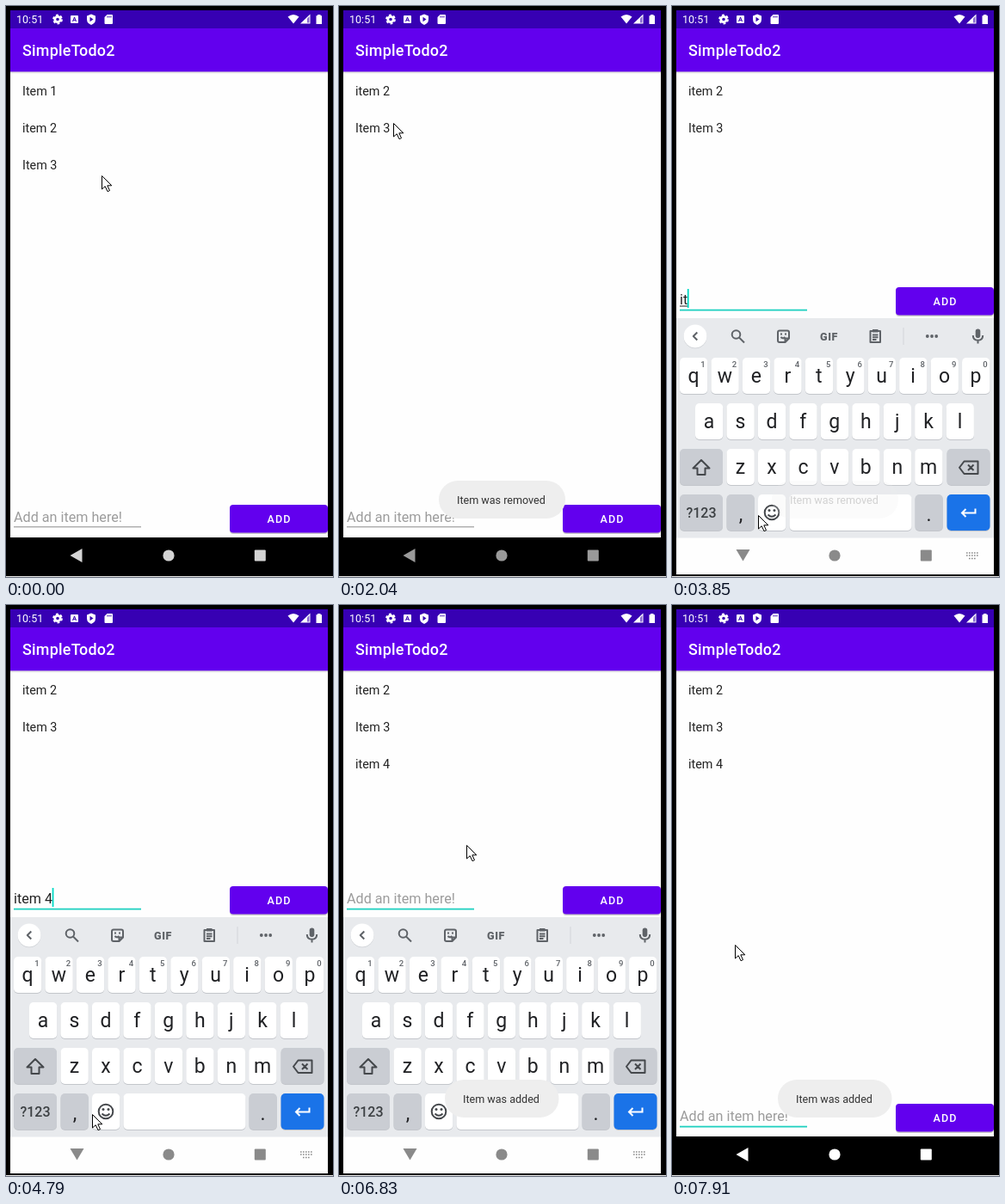
Recreate the animation shown at these times as an HTML page. Size 380x664 px, loop 8000 ms.

```html
<!DOCTYPE html>
<html lang="en">
<head>
<meta charset="utf-8">
<title>Todo list</title>
<style>
html, body { margin: 0; width: 100%; height: 100%; overflow: hidden; background: #000; }
svg { display: block; width: 100%; height: 100%; }
text { font-family: Roboto, "Noto Sans", sans-serif; white-space: pre; }
.mid { text-anchor: middle; }
.title { font-size: 17.96px; font-weight: 500; letter-spacing: .0125em; fill: #fff; }
.item { font-size: 14.37px; fill: #222; }
.field { font-size: 16.16px; }
.note { font-size: 12.57px; fill: #333; }
.letter { font-size: 23px; fill: #202124; text-anchor: middle; }
.digit { font-size: 9.5px; fill: #5f6368; text-anchor: middle; font-weight: 500; }
.word { font-size: 15px; fill: #3c4043; text-anchor: middle; }
.line { fill: none; stroke: #5f6368; stroke-width: 2; stroke-linejoin: round; }
.line.dark { stroke: #45484c; }
</style>
</head>
<body>
<svg viewBox="0 0 380 664">
  <defs>
    <clipPath id="screen"><rect x="5" y="5" width="369" height="656"/></clipPath>
    <linearGradient id="drop" x2="0" y2="1">
      <stop stop-opacity=".2"/><stop offset="1" stop-opacity="0"/>
    </linearGradient>
  </defs>
  <rect width="380" height="664"/>
  <rect y="663" width="380" height="1" fill="#e8e8e8"/>
  <g clip-path="url(#screen)">
    <rect x="5" y="5" width="369" height="613" fill="#fefefe"/>
    <rect x="5" y="76" width="369" height="3" fill="url(#drop)"/>
    <rect x="5" y="26" width="369" height="50.4" fill="#6200ee"/>
    <rect x="5" y="5" width="369" height="21" fill="#3700b3"/>
    <text class="title" x="19" y="58">SimpleTodo2</text>

    <g fill="#fff">
      <text x="12" y="20" font-size="12.57">10:51</text>
      <circle cx="60" cy="15.5" r="3.2" fill="none" stroke="#fff" stroke-width="2.8"/>
      <circle cx="60" cy="15.5" r="5" fill="none" stroke="#fff" stroke-width="1.8" stroke-dasharray="2.8 2.436"/>
      <rect x="75" y="11" width="9" height="9" rx="1"/>
      <text class="mid" x="79.5" y="18.2" font-size="7.5" font-weight="700" fill="#3700b3">A</text>
      <path d="M99 9.5l5 2v4q0 4.5-5 6.5q-5-2-5-6.5v-4z"/>
      <path d="M97.5 12.8v5.4l4-2.7z" fill="#3700b3"/>
      <path d="M117.5 10H123q1 0 1 1v9q0 1-1 1h-7.5q-1 0-1-1v-7z"/>
      <path d="M118 11.5v2M120 11.5v2M122 11.5v2" stroke="#3700b3"/>
      <path d="M327.5 12.5q6.5-5 13 0L334 20.5z"/>
      <path d="M342 20.5L353.5 9.5v11z"/>
      <path d="M350 14.5l2.5-2.4v7.4H350z" fill="#3700b3" opacity=".6"/>
      <path d="M362 10h3.5v1.2h1.5V21h-6.5v-9.8H362z"/>
    </g>

    <g id="list">
      <text class="item" x="19">Item 1</text>
      <text class="item" x="19">item 2</text>
      <text class="item" x="19">Item 3</text>
      <text class="item" x="19">item 4</text>
    </g>

    <g id="form">
      <text class="field" id="hint" x="9" y="599.7" fill="#9c9c9c">Add an item here!</text>
      <text class="field" id="typed" x="9" y="599.7" fill="#222"></text>
      <rect id="compose" x="9" y="601.5" height="1" fill="#222"/>
      <rect id="under" x="9" width="148"/>
      <rect id="caret" y="582" width="1.8" height="22" fill="#03dac5"/>
      <rect x="260" y="582" width="114" height="32" rx="4" opacity=".2"/>
      <rect x="260" y="580" width="114" height="32.5" rx="4" fill="#6200ee"/>
      <rect id="press" x="260" y="580" width="114" height="32.5" rx="4" fill="#fff"/>
      <text class="mid" x="317.5" y="600.8" font-size="12.57" font-weight="500" letter-spacing="1.12" fill="#fff">ADD</text>
    </g>

    <g id="board"></g>

    <rect id="shade" x="5" y="618" width="369" height="43"/>
    <g id="nav">
      <path id="back"/>
      <circle cx="189" cy="639" r="6.6"/>
      <rect x="288.8" y="632.5" width="13" height="13" rx="1"/>
    </g>
    <path id="switch" d="M342 636h14M342 639h14M345 642.5h8" stroke="#8a8a8a" stroke-width="1.5" stroke-dasharray="1.6 1.4"/>

    <g id="toast">
      <rect y="552" height="44" rx="22" fill="#eee"/>
      <text class="note" y="579"></text>
    </g>
  </g>
  <path id="mouse" d="M.5.5V16l3.700-3.300L7 18.700l2.500-1.100L6.800 11.800H11.800Z" fill="#fff" stroke="#000"/>
</svg>

<script>
const $ = id => document.getElementById(id);
const set = (el, attrs) => { for (const k in attrs) el.setAttribute(k, attrs[k]); };
const ramp = (t, from, to) => Math.max(0, Math.min(1, (t - from) / (to - from)));
const smooth = p => p * p * (3 - 2 * p);

const LOOP = 8000, PACE = 134;
const REMOVE = 1650, FOCUS = 2670, OPEN = 2790, TYPE = 3610, TYPED = 4540, CLEAR = 4790, ADD = 6250, CLOSE = 7400;

// The screen refreshes in bursts, evenly paced, and rests between them
const bursts = [[0, 0], [120, 930], [REMOVE, FOCUS], [OPEN, 3210], [TYPE, TYPED],
  [CLEAR, CLEAR], [5100, 6100], [ADD, 7250], [CLOSE, 7910]];

function snap(now) {
  const [from, to] = bursts.filter(b => b[0] <= now).pop();
  const step = (to - from) / Math.round((to - from) / PACE) || 1;
  return Math.min(to, from + Math.floor((now - from) / step) * step);
}

// Stops of the pointer: time, x, y
const stops = [[0, 111, 197], [930, 58, 94], [REMOVE, 58, 94], [2030, 63, 136], [2550, 92, 627],
  [FOCUS, 100, 592], [5100, 100, 592], [5670, 235, 231], [6100, 300, 338], [ADD, 300, 338],
  [6820, 148, 279], [7250, 80, 642], [CLOSE, 80, 640], [7910, 73, 395]];

function pointer(t) {
  const i = Math.max(1, stops.findIndex(s => s[0] >= t));
  const [t0, x0, y0] = stops[i - 1], [t1, x1, y1] = stops[i];
  const p = smooth(ramp(t, t0, t1));
  return [x0 + (x1 - x0) * p, y0 + (y1 - y0) * p].map(Math.round);
}

const key = (x, y, w, fill = "#fff") => [[1, "#c3c6cb"], [0, fill]].map(([dy, c]) =>
  `<rect x="${x}" y="${y + dy}" width="${w}" height="42" rx="5" fill="${c}"/>`).join("");

function letters(str, x0, y, digits) {
  return [...str].map((c, i) => {
    const x = x0 + i * 36.45;
    return key(x, y, 32.3) + `<text class="letter" x="${x + 16}" y="${y + 28.5}">${c}</text>` +
      (digits ? `<text class="digit" x="${x + 27}" y="${y + 11}">${(i + 1) % 10}</text>` : "");
  }).join("");
}

function buildBoard() {
  const grey = "#cacdd3";
  const dots = [-1, 0, 1].map(i => `<circle cx="${302 + i * 5.2}" cy="384" r="1.9"/>`).join("");
  $("board").innerHTML = `
    <rect x="5" y="363" width="369" height="256" fill="#e8eaed"/>
    <rect x="5" y="618.5" width="369" height="43" fill="#fefefe"/>
    <circle cx="27" cy="384.7" r="13.5" fill="#c9ccd1"/>
    <circle cx="27" cy="384" r="13.5" fill="#fff"/>
    <path class="line" id="chevron"/>
    <g id="tools">
      <circle class="line" cx="74.5" cy="382" r="4.8"/>
      <path class="line" d="M78 385.5l6 6"/>
      <path class="line" d="M125 377.5h9q2 0 2 2v7l-4.500 4.500h-6.500q-2 0-2-2v-9.500q0-2 2-2zM136 386.500h-4.500v4.500M126.500 385q2.500 2.500 5 0"/>
      <path d="M126 380.5h2v2h-2zM131 380.5h2v2h-2z" fill="#5f6368"/>
      <text class="mid" x="182.5" y="388.5" font-size="12.5" font-weight="900" letter-spacing=".6" fill="#5f6368">GIF</text>
      <path class="line" d="M230.5 378h11.5v13h-11.5zM233 382.5h6.5M233 385.2h6.5M233 388h4.5"/>
      <path d="M233 376h6.5v3.5H233z" fill="#5f6368"/>
      <path d="M269 374v20" stroke="#d2d5d9"/>
      <g fill="#5f6368">${dots}</g>
    </g>
    <g id="words">
      <text class="word" x="94" y="389">items</text>
      <text class="word" x="192" y="389" font-weight="500">item</text>
      <text class="word" x="290" y="389">Item</text>
    </g>
    <rect x="352.7" y="375.5" width="5.6" height="10.5" rx="2.8" fill="#5f6368"/>
    <path class="line" d="M349.8 383q0 5.7 5.7 5.7t5.7-5.7M355.5 389v3.5"/>
    ${letters("qwertyuiop", 9, 409, true)}
    ${letters("asdfghjkl", 27, 462)}
    ${key(9, 515, 50, grey)}${letters("zxcvbnm", 63.5, 515)}${key(319.5, 515, 50, grey)}
    <path class="line dark" d="M34 528l9.500 9.500H38.500v7.500h-9v-7.500H24.500z"/>
    <path class="line dark" d="M339.5 529.5h16v14.5h-16l-5.5-7.250zM344 533.500l6.500 6.500M350.500 533.500l-6.500 6.500"/>
    ${key(9, 568, 50, grey)}${key(63.5, 568, 32.3, grey)}${key(100, 568, 32.3)}
    ${key(136.5, 568, 142)}${key(282.5, 568, 32.3, grey)}${key(319.5, 568, 50, "#1a73e8")}
    <text class="mid" x="34" y="595" font-size="16" font-weight="500" fill="#3c4043">?123</text>
    <text class="letter" x="80" y="599">,</text>
    <text class="letter" x="298.5" y="599">.</text>
    <circle class="line dark" cx="116" cy="589" r="8.300"/>
    <path class="line dark" d="M111.5 591.5q4.5 4.500 9 0"/>
    <g fill="#45484c"><circle cx="113" cy="586.5" r="1.500"/><circle cx="119" cy="586.5" r="1.500"/></g>
    <path d="M352.5 584.5v5h-15M341.5 585l-4.500 4.500l4.500 4.500" fill="none" stroke="#fff" stroke-width="2"/>`;
}

function drawList(t) {
  const p = ramp(t, REMOVE + 70, REMOVE + 320), up = 43 * p * (2 - p);
  [...$("list").children].forEach((row, i) => set(row, {
    y: 103.5 + 43 * i - (i ? up : 0),
    opacity: i === 0 ? 1 - ramp(t, REMOVE - 60, REMOVE + 60) : i === 3 ? ramp(t, ADD - 60, ADD + 60) : 1
  }));
}

function drawForm(t) {
  const focus = t >= FOCUS, typing = t >= TYPE && t < TYPED;
  const count = t >= TYPE && t < ADD ? Math.ceil(1 + 5 * ramp(t, TYPE, TYPED)) : 0;
  const str = "item 4".slice(0, count), typed = $("typed");
  typed.textContent = str;
  const w = count ? typed.getComputedTextLength() : 0;
  const edit = typing ? t : [FOCUS, TYPED, ADD].filter(v => v <= t).pop();
  set($("form"), { transform: `translate(0 ${t >= OPEN && t < CLOSE ? -253 : 0})` });
  set($("hint"), { opacity: count ? 0 : 1 });
  set($("compose"), { width: count < 5 ? w : 0 });
  set($("under"), focus ? { y: 605.7, height: 1.8, fill: "#1fd0c0" } : { y: 605.3, height: 1, fill: "#8a8a8a" });
  set($("caret"), { x: 8.6 + w, opacity: focus && (t - edit) % 1000 < 500 ? 1 : 0 });
  set($("press"), { opacity: .2 * (ramp(t, 5960, 6100) - ramp(t, 6110, 6400)) });
}

// 0 with the keyboard fully up, 1 when it is away
const away = t => (1 - ramp(t, OPEN - 30, 3210) + ramp(t, CLOSE - 150, CLOSE + 250)) ** 3;

function drawBoard(t) {
  const gone = away(t), hints = t > TYPE + 2 * PACE && t < CLEAR;
  const turn = hints ? 1 : -1;
  set($("board"), { opacity: t >= OPEN && gone < 1 ? 1 : 0, transform: `translate(0 ${287 * gone})` });
  set($("tools"), { opacity: hints ? 0 : 1 });
  set($("words"), { opacity: hints ? 1 : 0 });
  set($("chevron"), { d: `M${27 - 2.3 * turn} 379.5l${4.5 * turn} 4.5l${-4.5 * turn} 4.5` });
}

function drawNav(t) {
  const up = t >= OPEN + PACE && t < CLOSE;
  const grey = t >= CLOSE ? 255 : t >= OPEN ? 138 : 212 - 58 * ramp(t, 0, 930);
  set($("shade"), { opacity: away(t) });
  set($("nav"), { fill: `rgb(${grey},${grey},${grey})` });
  set($("back"), { d: up && t > OPEN + 2 * PACE ? "M74.5 632h16L82.5 645.5z" : "M88.5 631v16L74.5 639z" });
  set($("switch"), { opacity: up ? 1 : 0 });
}

function drawToast(t) {
  const added = t >= ADD, x = added ? 123 : 116;
  const [box, label] = $("toast").children;
  set($("toast"), { opacity: ramp(t, REMOVE, REMOVE + 240) - ramp(t, TYPE, TYPE + 170) + ramp(t, ADD, ADD + 240) });
  set(box, { x, width: added ? 132.5 : 147 });
  set(label, { x: x + 21 });
  label.textContent = added ? "Item was added" : "Item was removed";
}

function draw(t) {
  drawList(t);
  drawForm(t);
  drawBoard(t);
  drawNav(t);
  drawToast(t);
  set($("mouse"), { transform: `translate(${pointer(t)})` });
}

buildBoard();
const start = performance.now();
let last = -1;
function frame() {
  const t = snap((performance.now() - start) % LOOP);
  if (t !== last) draw(last = t);
  requestAnimationFrame(frame);
}
frame();
</script>
</body>
</html>
```
